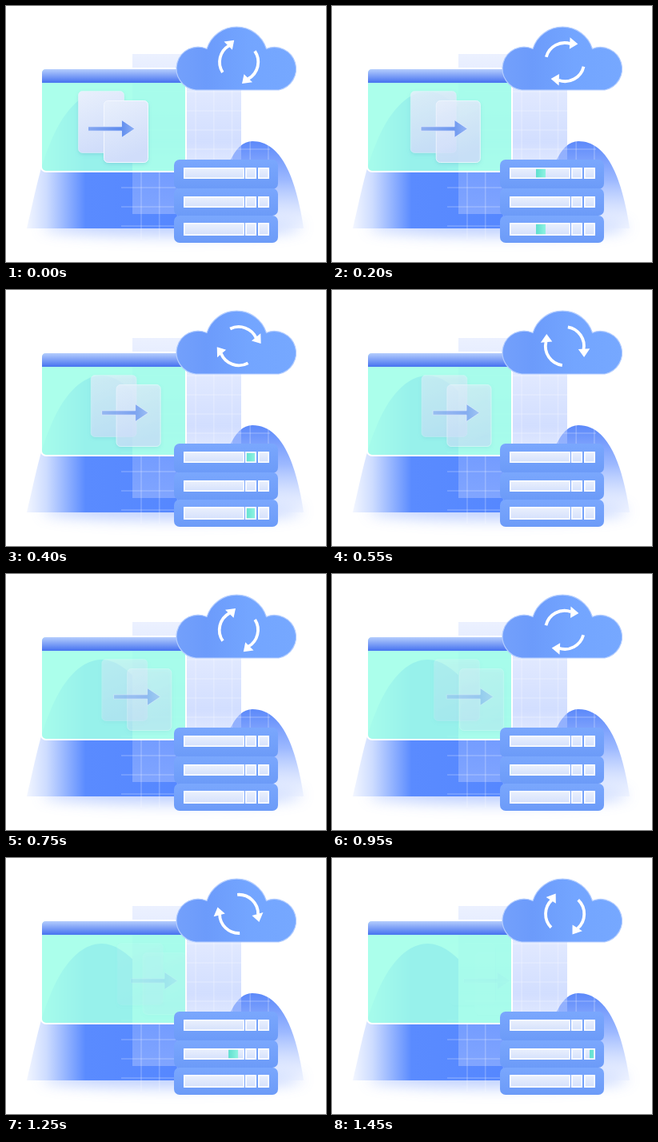
An HTML page that plays this animation: 400 px wide and 320 px high, repeating every 1.5 s.

```html
<!DOCTYPE html>
<html lang="en">
<head>
<meta charset="utf-8">
<title>Cloud sync</title>
<style>
html, body { margin: 0; width: 100%; height: 100%; overflow: hidden; background: #fff; }
svg { display: block; width: 100vw; height: 100vh; }
</style>
</head>
<body>
<svg viewBox="0 0 400 320">
  <defs>
    <linearGradient id="hillL" gradientUnits="userSpaceOnUse" x1="26" y1="0" x2="230" y2="0">
      <stop offset="0" stop-color="#5a8bff" stop-opacity=".08"/>
      <stop offset=".12" stop-color="#5a8bff" stop-opacity=".3"/>
      <stop offset=".36" stop-color="#5a8bff"/>
      <stop offset="1" stop-color="#5587ff"/>
    </linearGradient>
    <linearGradient id="hillR" x1="0" y1="0" x2="0" y2="1">
      <stop offset="0" stop-color="#5c89fa"/>
      <stop offset=".45" stop-color="#9db9ff"/>
      <stop offset="1" stop-color="#dfe8ff" stop-opacity=".4"/>
    </linearGradient>
    <linearGradient id="glass" x1="0" y1="0" x2="0" y2="1">
      <stop offset="0" stop-color="#b4c8ff" stop-opacity=".26"/>
      <stop offset=".55" stop-color="#b4c8ff" stop-opacity=".6"/>
      <stop offset=".75" stop-color="#b4c8ff" stop-opacity=".32"/>
      <stop offset="1" stop-color="#b4c8ff" stop-opacity=".45"/>
    </linearGradient>
    <linearGradient id="head" x1="0" y1="0" x2="0" y2="1">
      <stop offset="0" stop-color="#b4cdfd"/>
      <stop offset="1" stop-color="#4672f0"/>
    </linearGradient>
    <linearGradient id="card" x1="0" y1="0" x2=".3" y2="1">
      <stop offset="0" stop-color="#e9f0fc"/>
      <stop offset="1" stop-color="#d0ddfa"/>
    </linearGradient>
    <linearGradient id="arrow" gradientUnits="userSpaceOnUse" x1="102" y1="0" x2="161" y2="0">
      <stop offset="0" stop-color="#86a8f0"/>
      <stop offset=".7" stop-color="#5d8bee"/>
      <stop offset="1" stop-color="#8fb0f5"/>
    </linearGradient>
    <linearGradient id="cloud" x1="0" y1="0" x2="1" y2="0">
      <stop offset="0" stop-color="#73a0fb"/>
      <stop offset=".25" stop-color="#6c9bfb"/>
      <stop offset=".6" stop-color="#73a5ff"/>
      <stop offset="1" stop-color="#76a8ff"/>
    </linearGradient>
    <linearGradient id="unit" x1="0" y1="0" x2="0" y2="1">
      <stop offset="0" stop-color="#7aa7fd"/>
      <stop offset="1" stop-color="#6c9bf8"/>
    </linearGradient>
    <linearGradient id="bar" x1="0" y1="0" x2="0" y2="1">
      <stop offset="0" stop-color="#eaf0fd"/>
      <stop offset="1" stop-color="#d5e1fc"/>
    </linearGradient>
    <linearGradient id="light" x1="0" y1="0" x2="1" y2="0">
      <stop offset="0" stop-color="#5edfce"/>
      <stop offset="1" stop-color="#8ff3e2"/>
    </linearGradient>
    <filter id="soft" x="-20%" y="-200%" width="140%" height="500%"><feGaussianBlur stdDeviation="9"/></filter>
    <filter id="shade" x="-20%" y="-20%" width="140%" height="140%">
      <feDropShadow dx="0" dy="2" stdDeviation="2" flood-color="#5aa8c8" flood-opacity=".3"/>
    </filter>
    <clipPath id="behind"><path d="M0 90H158V207H240V278H0Z"/></clipPath>
  </defs>

  <rect width="400" height="320" fill="#fff"/>
  <ellipse cx="208" cy="276" rx="162" ry="11" fill="#a9c1ff" opacity=".8" filter="url(#soft)"/>
  <path d="M26 278C37 232 42 202 55 172C70 135 92 107 120 107C150 107 185 150 212 208L230 278Z" fill="#fff" clip-path="url(#behind)"/>
  <path d="M26 278C37 232 42 202 55 172C70 135 92 107 120 107C150 107 185 150 212 208L230 278Z" fill="url(#hillL)" clip-path="url(#behind)"/>
  <path d="M258 278C270 205 285 169 308 169C343 169 362 212 372 278Z" fill="url(#hillR)"/>
  <rect x="158" y="60" width="136" height="200" fill="url(#glass)"/>
  <g id="grid" stroke="#fff" stroke-opacity=".22" stroke-width="1.6"></g>

  <rect x="44" y="78" width="181" height="129" rx="6" fill="#a0ffe9" fill-opacity=".88" stroke="#fff" stroke-width="2"/>
  <path d="M45 96V84Q45 79 50 79H219Q224 79 224 84V96Z" fill="url(#head)"/>

  <g id="cards" stroke="#f3f7ff" stroke-width="1" filter="url(#shade)">
    <rect x="90.5" y="106.5" width="57" height="77" rx="5" fill="url(#card)" stroke-opacity=".4"/>
    <rect x="122.5" y="118.5" width="55" height="77" rx="5" fill="url(#card)"/>
  </g>
  <path id="move" d="M102.5 150.8H144.5V142.5L161 153.5L144.5 164.5V156.2H102.5Z" fill="url(#arrow)" stroke="#e4edff" stroke-width=".8"/>

  <path d="M237 105A27 27 0 1 1 251 53.5A39 39 0 0 1 325.5 53.5A27 27 0 1 1 341 105Z" fill="url(#cloud)" stroke="#b3cdff" stroke-width="1.2"/>
  <g id="sync" fill="#fff">
    <path d="M270.8 83A24 24 0 0 1 279 49.3" fill="none" stroke="#fff" stroke-width="3.8"/>
    <path d="M272.5 44.5L285.2 42.8L282.8 54.8Z"/>
    <path d="M311 56.3A24 24 0 0 1 302.8 91" fill="none" stroke="#fff" stroke-width="3.8"/>
    <path d="M295 97L297.5 85.3L308 95.3Z"/>
  </g>

  <g id="rack"></g>
</svg>
<script>
const NS = "http://www.w3.org/2000/svg";
const LOOP = 1500, STEP = 50;
const get = id => document.getElementById(id);
const [grid, cards, move, sync, rack] = ["grid", "cards", "move", "sync", "rack"].map(get);

function add(parent, tag, attrs) {
  const el = document.createElementNS(NS, tag);
  for (const k in attrs) el.setAttribute(k, attrs[k]);
  return parent.appendChild(el);
}

for (let i = 0; i < 8; i++) {
  const x = 169 + i * 22.7, y = 107 + i * 24;
  add(grid, "path", { d: `M${x} ${i < 3 ? 208 : 100}V${i < 3 ? 292 : 200}` });
  add(grid, "path", { d: `M${y < 200 ? 166 : 144} ${y}H${y < 200 ? 330 : 212}` });
}

// Each unit holds one wide slot and two small ones; the light shows only inside them.
const slots = [[222, 76], [299, 14], [315, 14]];
const units = [[192, 37, 202, 14, 0], [228, 34, 238, 14, 945], [262, 34, 271, 16, 0]];
const lights = units.map(([y, h, top, tall, start], i) => {
  add(rack, "rect", { x: 210, y, width: 130, height: h, rx: 7, fill: "url(#unit)" });
  const clip = add(rack, "clipPath", { id: "slots" + i });
  for (const [x, w] of slots) {
    add(rack, "rect", {
      x: x + .8, y: top + .8, width: w - 1.6, height: tall - 1.6,
      fill: "url(#bar)", stroke: "#fff", "stroke-width": 1.6
    });
    add(clip, "rect", { x: x + 1.8, y: top + 1.8, width: w - 3.6, height: tall - 3.6 });
  }
  const g = add(rack, "g", { "clip-path": `url(#slots${i})` });
  const el = add(g, "rect", { y: top, width: 12, height: tall, fill: "url(#light)" });
  return { el, start };
});

function draw(t) {
  const left = 1 - t / LOOP;
  cards.setAttribute("transform", `translate(${t * .039})`);
  for (const c of cards.children) c.setAttribute("opacity", left ** 1.35);
  move.setAttribute("transform", `translate(${t * .0428})`);
  move.setAttribute("opacity", left);
  sync.setAttribute("transform", `rotate(${t * 360 / LOOP} 291 70)`);
  for (const { el, start } of lights) {
    el.setAttribute("x", 211 + (t - start) * .22);
  }
}

let begin;
function tick(now) {
  begin ??= now;
  draw(Math.floor((now - begin) % LOOP / STEP) * STEP);
  requestAnimationFrame(tick);
}
draw(0);
requestAnimationFrame(tick);
</script>
</body>
</html>
```
